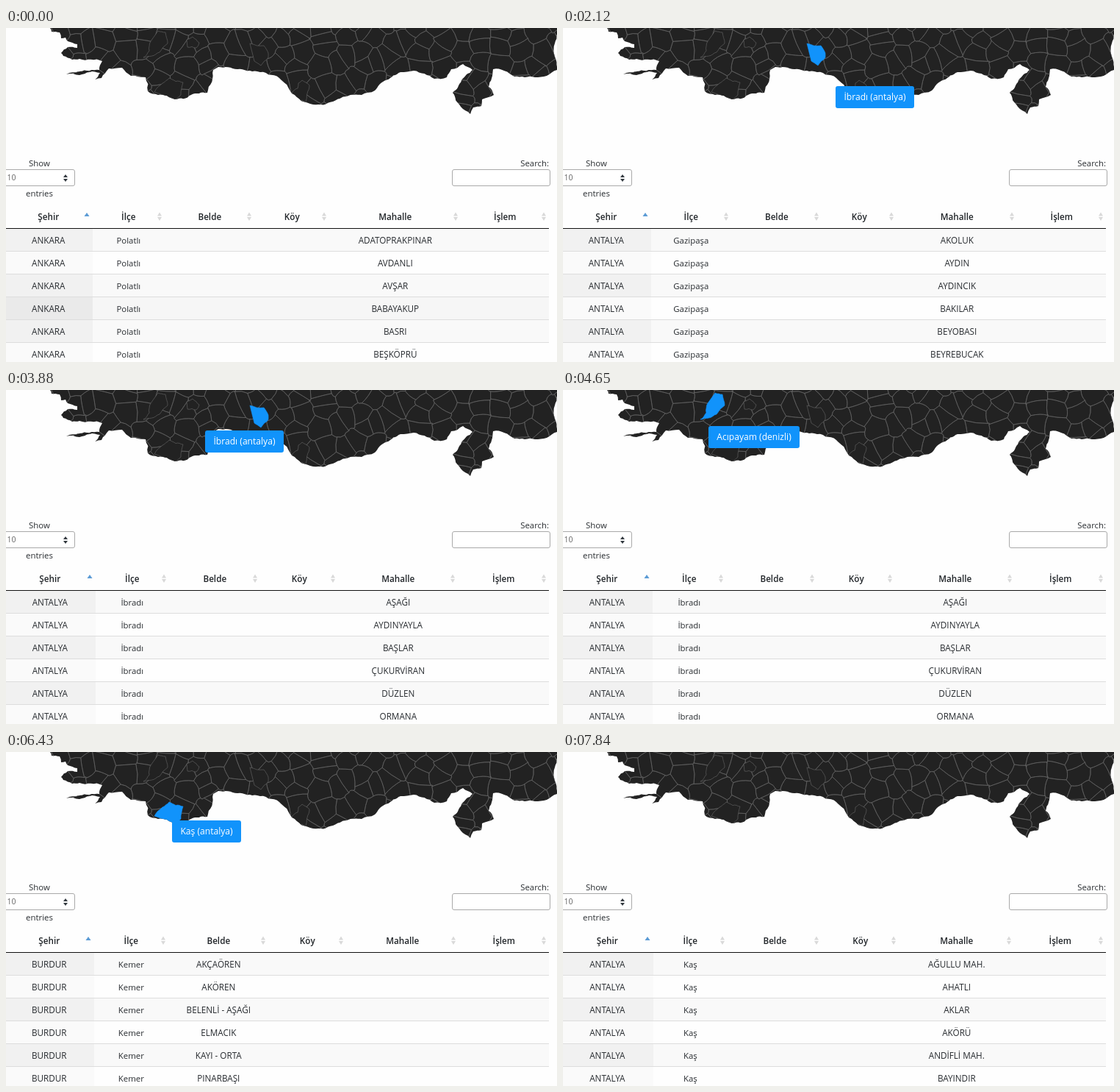
Recreate the animation shown at these times as an HTML page. Size 750x454 px, loop 8 s.

```html
<!DOCTYPE html>
<html lang="tr">
<head>
<meta charset="utf-8">
<style>
html, body { margin: 0; width: 100%; height: 100%; overflow: hidden; background: #fefefe; }
svg { display: block; width: 750px; height: 454px; }
text { font: 11.7px "Open Sans", "Noto Sans", sans-serif; fill: #282c30; text-anchor: middle; }
.small { font-size: 11.4px; }
.head { font-weight: 600; fill: #212529; }
.tip { fill: #fff; font-size: 12.1px; }
.field { fill: #fff; stroke: #a9a9a9; }
</style>
</head>
<body>
<svg viewBox="0 0 750 454">
  <defs><clipPath id="clip"><path id="clipShape"/></clipPath></defs>
  <path id="land" fill="#222"/>
  <g clip-path="url(#clip)" fill="none" stroke-width=".6">
    <path id="borders" stroke="#686868"/>
    <g id="districts"></g>
  </g>
  <g id="tip">
    <rect height="30" rx="3" fill="#1193fb"/>
    <text class="tip"></text>
  </g>
  <text class="small" x="45.5" y="188">Show</text>
  <rect class="field" x="-10.5" y="192.5" width="104" height="22" rx="2.5"/>
  <text x="7.5" y="207" style="font-size:10.5px;fill:#666">10</text>
  <path d="M78 203l3-4 3 4zM78 205l3 4 3-4z" fill="#343a40"/>
  <text class="small" x="45.5" y="229">entries</text>
  <text class="small" x="739" y="188" style="text-anchor:end">Search:</text>
  <rect class="field" x="607.5" y="192.5" width="133" height="22" rx="2.5"/>
  <g id="table"></g>
</svg>
<script>
const $ = id => document.getElementById(id);
const LOOP = 8000, BLUE = '#1193fb', WIDTH = 739;

let seed = 17;
const rand = () => (seed = (seed * 16807) % 2147483647) / 2147483647;
const jitter = size => (rand() - 0.5) * 2 * size;
const mix = (a, b, k) => a + (b - a) * k;
const points = s => s.trim().split(/\s+/).map(p => p.split(',').map(Number));

// Midpoint displacement between two points
function rough(a, b, amount) {
  const dx = b[0] - a[0], dy = b[1] - a[1];
  if (Math.hypot(dx, dy) < 5) return [b];
  const k = jitter(amount);
  const mid = [(a[0] + b[0]) / 2 - dy * k, (a[1] + b[1]) / 2 + dx * k];
  return [...rough(a, mid, amount), ...rough(mid, b, amount)];
}
const outline = (pts, amount) =>
  'M' + pts.flatMap((p, i) => i ? rough(pts[i - 1], p, amount) : [p]).join('L') + 'z';

const coast = points(`60,0 62,5 73,6 75,14 81,13 84,18 97,22 97,27 84,26 75,34 78,38 90,43 100,42
  131,45 127,57 100,59 82,63 100,64 128,61 121,70 130,68 140,55 158,54 170,65 190,67 193,86
  207,91 230,97 274,88 282,57 289,53 315,56 342,59 372,68 389,89 418,104 445,100 484,91 502,85
  537,60 555,58 583,69 600,67 606,56 622,49 635,57 608,88 619,107 632,117 636,108 647,106
  648,97 664,91 657,80 663,56 692,66 720,67 750,57`);

// Voronoi cell: clip a box around the site by each nearby bisector
function cell(site, sites) {
  let poly = [[-1, -1], [1, -1], [1, 1], [-1, 1]].map(([x, y]) => [site[0] + 50 * x, site[1] + 50 * y]);
  for (const other of sites) {
    const nx = other[0] - site[0], ny = other[1] - site[1];
    if (other === site || Math.hypot(nx, ny) > 100) continue;
    const side = p => (p[0] - site[0] - nx / 2) * nx + (p[1] - site[1] - ny / 2) * ny;
    poly = poly.flatMap((p, i) => {
      const q = poly[(i + 1) % poly.length], a = side(p), b = side(q), k = a / (a - b);
      const kept = a <= 0 ? [p] : [];
      return a * b < 0 ? [...kept, [mix(p[0], q[0], k), mix(p[1], q[1], k)]] : kept;
    });
  }
  return poly;
}

function borderPath() {
  const sites = [];
  for (let y = -10; y < 130; y += 21)
    for (let x = 50; x < 780; x += 27) sites.push([x + jitter(11), y + jitter(10)]);
  return sites.map(site => cell(site, sites).map((p, i, poly) => {
    const q = poly[(i + 1) % poly.length];
    const mx = (p[0] + q[0]) / 2, my = (p[1] + q[1]) / 2;
    return `M${p}Q${mx + 3 * Math.sin(mx)},${my + 3 * Math.cos(my)} ${q}`;
  }).join('')).join('');
}

const districts = [
  ['Gazipaşa (antalya)', '389,88 397,82 398,75 403,71 413,78 408,101 398,97'],
  ['İbradı (antalya)', '332,21 351,24 357,34 357,40 347,51 338,45'],
  ['Acıpayam (denizli)', '207,4 217,6 220,21 209,33 187,40 195,31 197,18'],
  ['Kemer (burdur)', '246,16 254,12 263,20 259,27 247,26'],
  ['Kaş (antalya)', '202,87 213,75 222,68 241,74 238,91 230,97']
].map(([label, shape]) => ({ label, shape: points(shape) }));

// Tooltip moves: each eases from the previous place
const HIDE = 7840, FRAME = 112;
const moves = [
  { start: 540, end: 770, x: 409, y: 106, id: 0 },
  { start: 1770, end: 2690, x: 337, y: 55, id: 1 },
  { start: 3760, end: 4120, x: 199, y: 54, id: 2 },
  { start: 4430, end: 4650, x: 198, y: 49, id: 2 },
  { start: 5090, end: 5760, x: 257, y: 33, id: 3 },
  { start: 6200, end: 6530, x: 220, y: 105, id: 4 },
  { start: 6630, end: 6960, x: 221, y: 100, id: 4 }
];

function tipAt(time) {
  let tip = { x: 395, y: 118, id: -1 };
  if (time >= HIDE) return tip;
  for (const m of moves) {
    if (time < m.start) break;
    const steps = Math.round((m.end - m.start) / FRAME);
    const done = Math.floor((time - m.start) / (m.end - m.start) * steps + 0.001) / steps;
    const k = 1 - Math.max(0, 1 - done) ** 1.6;
    tip = {
      x: Math.round(mix(tip.x, m.x, k)),
      y: Math.round(mix(tip.y, m.y, k)),
      id: k > 0.5 ? m.id : tip.id
    };
  }
  return tip;
}

const titles = ['Şehir', 'İlçe', 'Belde', 'Köy', 'Mahalle', 'İşlem'];
// edges: right sides of the first five columns
const tables = [
  { at: 0, city: 'ANKARA', town: 'Polatlı', edges: [118, 217, 339, 441, 620],
    names: 'ADATOPRAKPINAR,AVDANLI,AVŞAR,BABAYAKUP,BASRI,BEŞKÖPRÜ' },
  { at: 1320, city: 'ANTALYA', town: 'Gazipaşa', edges: [120, 230, 353, 455, 619],
    names: 'AKOLUK,AYDIN,AYDINCIK,BAKILAR,BEYOBASI,BEYREBUCAK' },
  { at: 3120, city: 'ANTALYA', town: 'İbradı', edges: [122, 223, 347, 453, 616],
    names: 'AŞAĞI,AYDINYAYLA,BAŞLAR,ÇUKURVİRAN,DÜZLEN,ORMANA' },
  { at: 4870, city: 'DENİZLİ', town: 'Acıpayam', edges: [118, 232, 358, 462, 617],
    names: 'AKALAN,AKŞAR,ALAATTİN,ALCI,ALİVEREN,APA' },
  { at: 5980, city: 'BURDUR', town: 'Kemer', edges: [120, 222, 358, 464, 617], column: 2,
    names: 'AKÇAÖREN,AKÖREN,BELENLİ - AŞAĞI,ELMACIK,KAYI - ORTA,PINARBAŞI' },
  { at: 7180, city: 'ANTALYA', town: 'Kaş', edges: [123, 225, 353, 458, 615],
    names: 'AĞULLU MAH.,AHATLI,AKLAR,AKÖRÜ,ANDİFLİ MAH.,BAYINDIR' }
];

const rect = (x, y, w, h, fill) =>
  `<rect x="${x}" y="${y}" width="${w}" height="${h}" fill="${fill}"/>`;
const text = (x, y, s, cls = '') => `<text class="${cls}" x="${x}" y="${y}">${s}</text>`;

function tableMarkup(t, hoverRow) {
  const edges = [-1, ...t.edges, WIDTH + 1];
  const center = i => (edges[i] + edges[i + 1]) / 2 - 0.7;
  let out = rect(0, 272, WIDTH, 1, '#111');
  titles.forEach((title, i) => {
    const x = edges[i + 1] - 8;
    out += text(center(i), 261, title, 'head');
    out += i
      ? `<path d="M${x - 3} 255.5l3-5 3 5zM${x - 3} 257l3 5 3-5z" fill="#d9d9d9"/>`
      : `<path d="M${x - 3.5} 256l3.5-5 3.5 5z" fill="#5b9bd5"/>`;
  });
  t.names.split(',').forEach((name, r) => {
    const y = 273 + 31 * r;
    const [row, first] = r === hoverRow ? ['#f6f6f6', '#eaeaea']
      : r % 2 ? ['#fefefe', '#fafafa'] : ['#f9f9f9', '#f1f1f1'];
    out += rect(0, y, WIDTH, 31, row) + rect(0, y, edges[1], 31, first);
    if (r) out += rect(0, y - 1, WIDTH, 1, '#ddd');
    out += text(center(0), y + 20, t.city);
    out += text(center(1), y + 20, t.town, 'small');
    out += text(center(t.column || 4), y + 20, name);
  });
  return out;
}

const land = outline([...coast, [750, 0]], 0.1);
$('land').setAttribute('d', land);
$('clipShape').setAttribute('d', land);
$('borders').setAttribute('d', borderPath());
$('districts').innerHTML = districts.map(d => `<path d="${outline(d.shape, 0.1)}"/>`).join('');
const shapes = [...$('districts').children];
const [tipBox, tipText] = $('tip').children;

function drawTip({ x, y, id }) {
  shapes.forEach((s, i) => {
    s.setAttribute('fill', i === id ? BLUE : '#222');
    s.setAttribute('stroke', i === id ? BLUE : '#686868');
  });
  $('tip').style.display = id < 0 ? 'none' : '';
  if (id < 0) return;
  tipText.textContent = districts[id].label;
  const width = Math.round(tipText.getComputedTextLength() + 23);
  $('tip').setAttribute('transform', `translate(${x} ${y})`);
  tipBox.setAttribute('width', width);
  tipText.setAttribute('x', width / 2);
  tipText.setAttribute('y', 19);
}

let shown;
function draw(time) {
  const table = tables.filter(t => t.at <= time).pop();
  const hoverRow = time < 100 ? 3 : -1;
  const key = `${table.at} ${hoverRow}`;
  if (key !== shown) $('table').innerHTML = tableMarkup(table, hoverRow);
  shown = key;
  drawTip(tipAt(time));
}

const start = performance.now();
function tick() {
  draw((performance.now() - start) % LOOP);
  requestAnimationFrame(tick);
}
tick();
</script>
</body>
</html>
```
